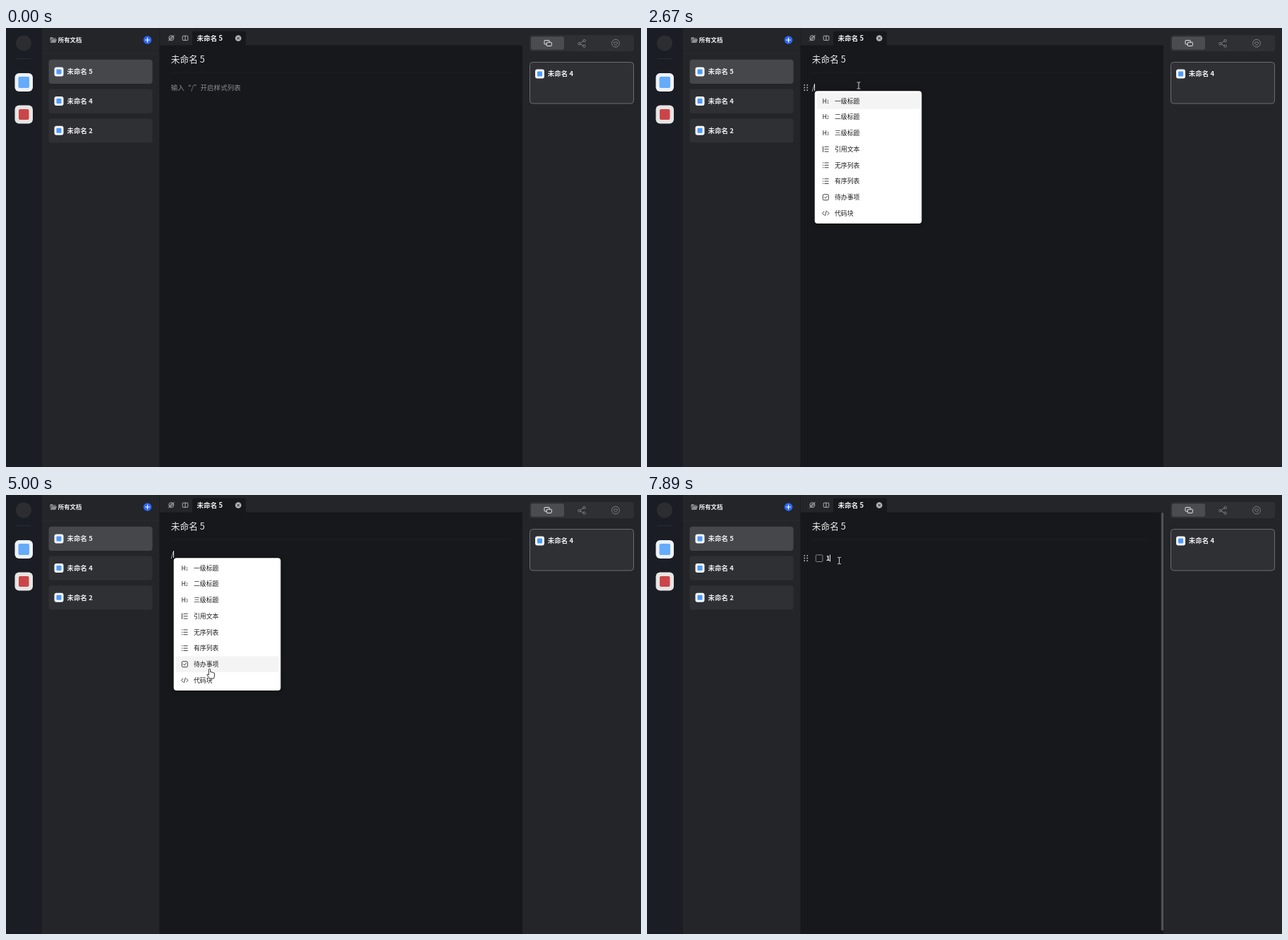
Recreate the animation shown at these times as an HTML page with a canvas. Size 900 px wide and 622 px high, loop 8000 ms.

```html
<!DOCTYPE html>
<html lang="zh-CN">
<head>
<meta charset="utf-8">
<title>文档编辑器</title>
<style>
  html, body { margin: 0; width: 100%; height: 100%; overflow: hidden; background: #17181b; }
  canvas { display: block; width: 900px; height: 622px; }
</style>
</head>
<body>
<canvas id="stage"></canvas>
<script>
const W = 900, H = 622, LOOP = 8000;
const FONT = '"Noto Sans CJK SC", "Noto Sans CJK", "Noto Sans", sans-serif';
const stage = document.getElementById('stage');
const dpr = window.devicePixelRatio || 1;
stage.width = W * dpr;
stage.height = H * dpr;
const c = stage.getContext('2d');

// ---- drawing helpers ----
function box(x, y, w, h, fill, r = 0, stroke, lw = 1) {
  c.beginPath();
  c.roundRect(x, y, w, h, r);
  if (fill) { c.fillStyle = fill; c.fill(); }
  if (stroke) { c.strokeStyle = stroke; c.lineWidth = lw; c.stroke(); }
}
function disc(x, y, r, fill, stroke, lw = 1) {
  c.beginPath();
  c.arc(x, y, r, 0, Math.PI * 2);
  if (fill) { c.fillStyle = fill; c.fill(); }
  if (stroke) { c.strokeStyle = stroke; c.lineWidth = lw; c.stroke(); }
}
function text(str, x, y, size, color, weight = 400) {
  c.font = `${weight} ${size}px ${FONT}`;
  c.fillStyle = color;
  c.fillText(str, x, y);
}
function path(d, x, y, stroke, lw = 1, fill) {
  const p = new Path2D(d);
  c.save();
  c.translate(x, y);
  c.lineJoin = c.lineCap = 'round';
  if (fill) { c.fillStyle = fill; c.fill(p); }
  if (stroke) { c.strokeStyle = stroke; c.lineWidth = lw; c.stroke(p); }
  c.restore();
}
function docIcon(x, y) {
  box(x, y, 13, 13, '#f4f7fb', 3);
  box(x + 3, y + 3, 7, 7, '#4f9bf8', 1);
}

// ---- fixed interface ----
function drawRail() {
  box(0, 0, 51, H, '#1a1d24');
  disc(25, 21.5, 11, '#2b2d30');
  box(15, 43, 20, 1, '#2a2d33');
  box(12.5, 64, 25.5, 26, '#eef2f6', 6);
  box(17.5, 69, 15.5, 16, '#65abfa', 2);
  box(12.5, 109.5, 25.5, 26, '#e6e5e4', 6);
  box(18, 115, 14.5, 15, '#cb4548', 2);
}

function drawSidebar() {
  box(51, 0, 166.5, H, '#242528');
  box(51, 36, 166.5, 1, '#292a2d');
  path('M0 1.2Q0 0 1 0H3.4L4.6 1.2H7.5Q8.4 1.2 8.4 2.4H2.6Q2 2.4 1.7 3L0 6.6Z', 62.5, 13, null, 0, '#8b8c8f');
  path('M2.4 0H9.6L8 4.6Q7.8 5 7.3 5H.2Z', 62.5, 16, null, 0, '#8b8c8f');
  text('所有文档', 73.8, 19.8, 8.4, '#f0f0f1', 700);
  disc(200.5, 17, 5.8, '#2c67f5');
  path('M-3 0H3M0 -3V3', 200.5, 17, '#fff', 1.2);
  ['5', '4', '2'].forEach((n, i) => {
    const y = 44.8 + i * 41.7;
    box(60.5, y, 147, 34.3, i ? '#2f3034' : '#46474b', 4);
    docIcon(68.5, y + 10.6);
    text('未命名 ' + n, 86.5, y + 20.3, 9.5, '#eeeeef', 600);
  });
}

function drawEditor(scroll) {
  box(217.5, 0, 514.5, H, '#17181b');
  box(217.5, 0, 514.5, 24.5, '#242528');
  box(264, 4.5, 76, 21, '#17181b', [3, 3, 0, 0]);
  disc(234.3, 14.2, 3.5, null, '#b9babc', .9);
  path('M-4 4L4 -4M-2.8 1.4L1.4 -2.8M-1.2 3L3 -1.2', 234.3, 14.2, '#b9babc', .9);
  box(250.2, 11.2, 7.6, 6.2, null, .8, '#b9babc', .9);
  path('M0 0V6', 254, 11.3, '#b9babc', .9);
  text('未命名 5', 270.5, 17.8, 9.6, '#f2f2f3', 600);
  disc(329.2, 14.5, 4.3, '#b4b5b7');
  path('M-1.5 -1.5L1.5 1.5M1.5 -1.5L-1.5 1.5', 329.2, 14.5, '#1a1b1e', 1);
  text('未命名 5', 233.8, 48.8, 12.7, '#ececed', 500);
  box(234, 62.5, scroll ? 479 : 482, 1, '#202124');
  if (scroll) box(728.8, 25, 3.2, 592, '#515255', 1);
}

function drawPanel() {
  box(732, 0, 168, H, '#242528');
  box(742, 10, 148, 23, '#2f3034', 4);
  box(744, 12.3, 47, 18.5, '#4b4c50', 3);
  box(763, 17.5, 7.2, 5.6, null, .8, '#e6e6e7');
  box(766.3, 20.2, 7, 5.3, '#4b4c50', .8, '#e6e6e7');
  const grey = '#85868a';
  path('M-2.3 .2L2.3 -3M-2.3 1.4L2.3 3.6', 816, 21.5, grey, .9);
  disc(812.4, 22.2, 1.7, null, grey, .9);
  disc(819.6, 18, 1.7, null, grey, .9);
  disc(819.6, 25.6, 1.7, null, grey, .9);
  disc(864, 21.6, 5.4, null, grey, .9);
  path('M0 2.6L-2.4 .2Q-3 -1.8 -1.3 -2Q-.4 -2 0 -1.1Q.4 -2 1.3 -2Q3 -1.8 2.4 .2Z', 864, 21.6, grey, .9);
  box(742.5, 48.5, 147, 58.5, '#2f3034', 4, '#6c6d70');
  docIcon(750, 58.5);
  text('未命名 4', 767.8, 68.4, 9.5, '#eeeeef', 600);
}

// ---- slash menu ----
const MENU = ['一级标题', '二级标题', '三级标题', '引用文本', '无序列表', '有序列表', '待办事项', '代码块'];
const ROW = 22.71, MENU_TOP = 92.2, INK = '#2b2b2d';

function menuIcon(i, y) {
  const lines = 'M-1.4 -3.4H4M-1.4 0H4M-1.4 3.4H4';
  if (i < 3) {
    text('H', 248.6, y + 3.2, 8.8, INK);
    text(i + 1, 254.8, y + 3.2, 5.6, INK);
  } else if (i === 3) {
    path(lines + 'M-3.7 -3.8V3.8', 253.2, y, INK, .9);
  } else if (i < 6) {
    path(lines + 'M-3.9 -3.4H-3.4M-3.9 0H-3.4M-3.9 3.4H-3.4', 253.2, y, INK, .9);
  } else if (i === 6) {
    box(249.3, y - 4, 8, 8, null, 1.4, INK, .9);
    path('M-1.9 0L-.5 1.4L2 -1.4', 253.3, y, INK, .9);
  } else {
    path('M-2.4 -2.4L-4.7 0L-2.4 2.4M2.4 -2.4L4.7 0L2.4 2.4M1 -3.4L-1 3.4', 253.3, y, INK, .9);
  }
}

function drawMenu(hover) {
  c.save();
  c.shadowColor = 'rgba(0,0,0,.35)';
  c.shadowBlur = 6;
  c.shadowOffsetY = 1;
  box(237.7, 89.2, 151.6, 187.8, '#fff', 4);
  c.restore();
  box(240.8, MENU_TOP + hover * ROW, 145.4, 22.6, '#f4f4f5', 2);
  MENU.forEach((label, i) => {
    const y = MENU_TOP + (i + .5) * ROW;
    menuIcon(i, y);
    text(label, 266, y + 3.2, 8.9, '#1d1d1f');
  });
}

// ---- pointer ----
// Each move: start, end, number of steps, way points evenly spaced in time.
const MOVES = [
  [130, 740, 10, [[878, 715], [303, 76]], u => 1 - (1 - u) ** 1.6],
  [940, 1480, 8, [[303, 76], [302, 80], [300, 81.5]]],
  [3750, 4520, 12, [[300, 81.5], [304, 93], [301, 117], [296, 142], [291, 190]]],
  [4590, 5000, 7, [[291, 190], [290, 220], [288.5, 246]]],
  [5270, 5340, 2, [[288.5, 246], [289.5, 239]]],
  [6730, 7220, 8, [[290.5, 239], [270, 150], [240, 86]]],
  [7550, 7820, 4, [[240, 86], [276, 95], [272.5, 93]]]
];

function pointer(t) {
  let move;
  for (const m of MOVES) if (t >= m[0]) move = m;
  if (!move) return [-50, -50];
  const [t0, t1, n, pts, ease = u => u] = move;
  const step = Math.min(n, Math.floor((t - t0) * (n - 1) / (t1 - t0) + 1e-3) + 1);
  const s = ease(step / n) * (pts.length - 1);
  const i = Math.min(pts.length - 2, Math.floor(s)), f = s - i;
  return [0, 1].map(k => pts[i][k] + (pts[i + 1][k] - pts[i][k]) * f);
}

const HAND = 'M-1.2 8.5V1Q0 -.8 1.2 1V5Q2.4 4 3.4 5.4Q4.5 4.6 5.3 5.9Q6.8 5.4 7 7V10Q6.8 12 6 14H0Q-1.5 11.5 -3.6 9Q-3.6 7 -1.2 8.5Z';
const ARROW = 'M0 0V12L2.8 9.4L4.6 13.4L6.4 12.6L4.6 8.8H8.4Z';
const BEAM = 'M-2 -4.6H-.6L0 -4L.6 -4.6H2M0 -4V4M-2 4.6H-.6L0 4L.6 4.6H2';

function drawPointer(x, y, menuOpen) {
  if (menuOpen && y > 89) path(HAND, x, y, '#222', .9, '#fff');
  else if (x > 732) path(ARROW, x, y, '#222', .8, '#fff');
  else path(BEAM, x, y, '#d4d4d5', 1);
}

// ---- editor content ----
const within = (t, a, b) => t >= a && t < b;
const blink = (t, t0) => Math.floor(Math.max(0, t - t0) / 530) % 2 === 0;

function grip(y) {
  for (let i = 0; i < 6; i++)
    box(222.3 + (i % 2) * 4, y - 4.6 + (i >> 1) * 3.7, 1.8, 1.8, '#b3b4b6', .6);
}
function caret(x, y) { box(x, y, 1, 10, '#e8e8e9'); }

function drawContent(t, menuOpen, todo) {
  if (within(t, 670, 740) || within(t, 1000, 3890)) grip(84.5);
  if (t >= 7150) grip(89.5);
  if (todo) {
    const typed = t >= 7890;
    box(239.3, 84.9, 9.6, 9.6, null, 1.2, '#8f9092', .9);
    if (typed) text('1', 253.8, 93.2, 9.5, '#eeeeef', 600);
    if (typed || blink(t, 6530)) caret(typed ? 259 : 254, 84.5);
  } else if (menuOpen) {
    text('/', 233.8, 88, 9.6, '#eeeeef', 500);
    if (blink(t, 2690)) caret(237, 79);
  } else {
    text('输入“/”开启样式列表', 233.8, 87.6, 9.52, '#8e8f91');
    if (within(t, 1410, 1940) || t >= 2400) caret(234, 79);
  }
}

function draw(t) {
  const menuOpen = within(t, 2670, 6530), todo = t >= 6530;
  let [x, y] = pointer(t);
  if (within(t, 6530, 6730)) x = 290.5;
  c.setTransform(dpr, 0, 0, dpr, 0, 0);
  drawRail();
  drawSidebar();
  drawEditor(todo);
  drawPanel();
  drawContent(t, menuOpen, todo);
  if (menuOpen) {
    const lagged = pointer(t - 70)[1];
    drawMenu(Math.max(0, Math.floor((lagged - MENU_TOP) / ROW)));
  }
  if (within(t, 1330, 1480)) disc(301.5, 80, 8.5, 'rgba(250,240,20,.7)');
  if (within(t, 6400, 6530)) disc(289, 239, 8, 'rgba(250,240,20,.7)');
  drawPointer(x, y, menuOpen);
}

const start = performance.now();
function frame(now) {
  draw(Math.max(0, now - start) % LOOP);
  requestAnimationFrame(frame);
}
requestAnimationFrame(frame);
</script>
</body>
</html>
```
